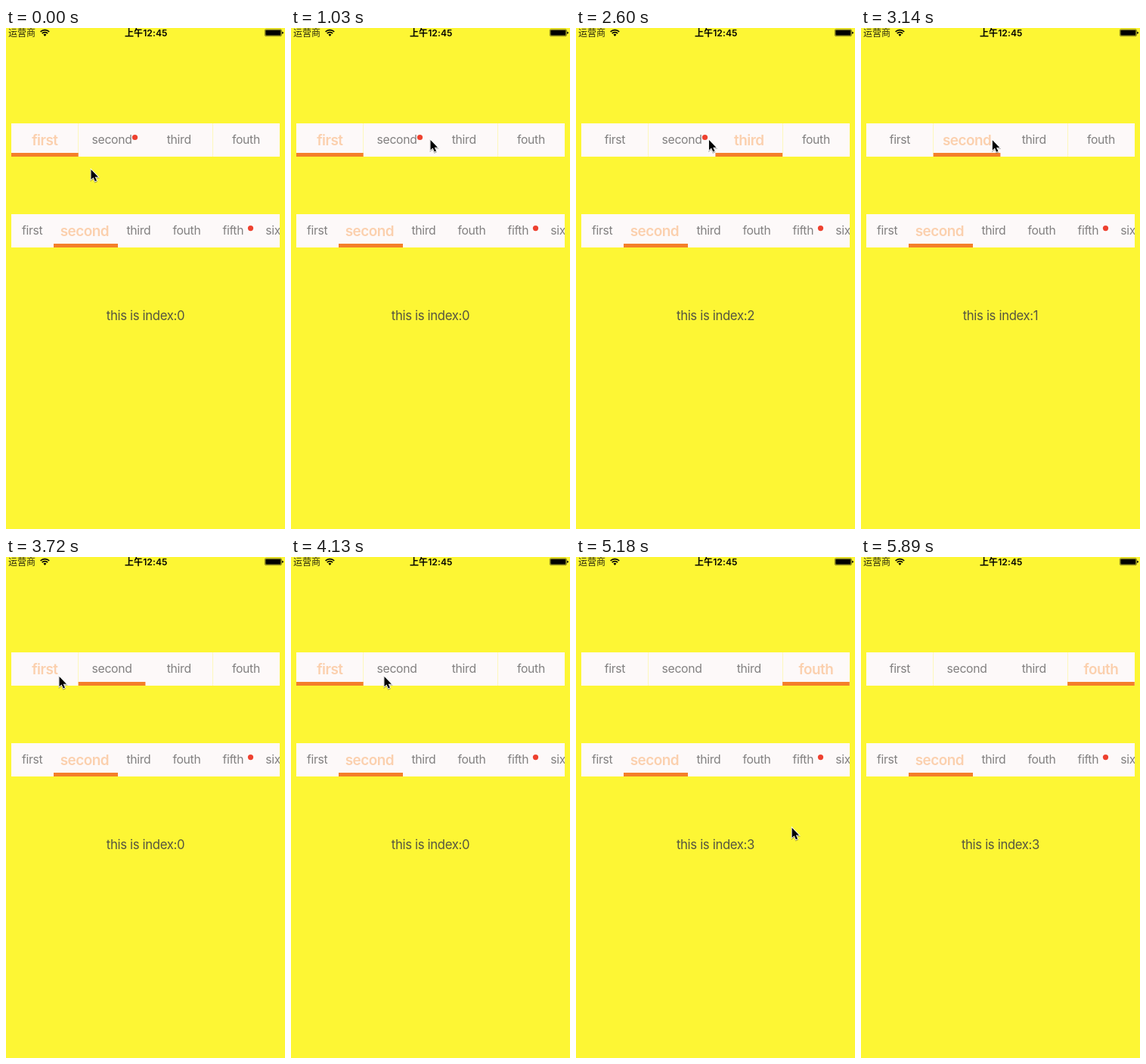
An HTML page for the animation above (6.74 s loop, 369x662 px).

```html
<!DOCTYPE html>
<html lang="zh">
<head>
<meta charset="utf-8">
<title>Segmented tabs</title>
<style>
  html, body { margin: 0; width: 100%; height: 100%; overflow: hidden; background: #fdf634; }
  svg { display: block; width: 100%; height: 100%; }
  text { font-family: Inter, "Noto Sans CJK SC", "Noto Sans CJK", sans-serif; font-optical-sizing: none; }
  .tab, #index { text-anchor: middle; letter-spacing: -.02em; }
  .tab { font-size: 15.74px; fill: #828080; }
  .tab.on { font-size: 18.9px; font-weight: 600; letter-spacing: -.027em; fill: #fbd0ae; }
  #index { font-size: 16.7px; fill: #555540; }
  .status { font-size: 12px; }
  .bar { fill: #fdf9f9; }
  .line { fill: #f47f2a; }
  .dot { fill: #ee412f; }
  .rule { fill: #fdf634; opacity: .3; }
  #cursor { filter: drop-shadow(.4px 1px .7px #0006); }
</style>
</head>
<body>
<svg viewBox="0 0 369 662">
  <defs><clipPath id="stripClip"><rect x="7" y="246" width="355" height="44"/></clipPath></defs>

  <g class="status">
    <text x="3" y="10.5" fill="#28270c">运营商</text>
    <text x="157" y="10.5" font-weight="600" letter-spacing=".1">上午12:45</text>
    <path d="M45.6 5a8.2 8.2 0 0 1 11.6 0M47.7 7.2a5.2 5.2 0 0 1 7.4 0" fill="none" stroke="#000" stroke-width="1.7"/>
    <path d="M51.4 11l-2-2.2a2.8 2.8 0 0 1 4 0z"/>
    <rect x="342.4" y="1.9" width="22" height="8.8" rx="1.4" fill="none" stroke="#000" stroke-width=".5"/>
    <rect x="343.3" y="2.8" width="20.2" height="7" rx=".7"/>
    <path d="M365.2 4.7q1.7 .3 1.7 1.6t-1.7 1.6z"/>
  </g>

  <rect class="bar" x="7" y="126" width="355" height="44"/>
  <rect class="rule" x="95" y="126" width="1" height="44"/>
  <rect class="rule" x="273" y="126" width="1" height="44"/>
  <g id="fixedTabs"></g>
  <rect class="line" id="line" y="165" height="5"/>
  <circle class="dot" id="badge" cx="170.5" cy="144.5" r="3.6"/>

  <g clip-path="url(#stripClip)">
    <rect class="bar" x="7" y="246" width="355" height="44"/>
    <g id="scrollTabs"></g>
    <rect class="line" x="63" y="285" width="85" height="5"/>
    <circle class="dot" cx="323.5" cy="264.6" r="3.6"/>
  </g>

  <text id="index" x="184.5" y="385.6"></text>
  <path id="cursor" d="M1 1v13.2l3-2.8 2.3 5.2 2.2-1-2.3-4.9h4.2z"
        stroke="#fff" stroke-width="1.6" paint-order="stroke"/>
</svg>
<script>
const LOOP = 6740, SLIDE = 300, LEFT = 7, TAB_WIDTH = 88.7;
const $ = id => document.getElementById(id);
const mix = (a, b, p) => a + (b - a) * p;
const ease = v => {
  const p = Math.min(1, Math.max(0, v));
  return p * p * (3 - 2 * p);
};

function addTab(group, name) {
  const label = document.createElementNS("http://www.w3.org/2000/svg", "text");
  label.textContent = name;
  label.setAttribute("class", "tab");
  group.append(label);
  return label;
}

function setSelected(label, selected, middle) {
  label.setAttribute("class", selected ? "tab on" : "tab");
  label.setAttribute("y", middle + (selected ? 6.7 : 5.4));
}

const names = ["first", "second", "third", "fouth", "fifth", "sixth"];

// Equal columns
const fixedTabs = names.slice(0, 4).map((name, i) => {
  const label = addTab($("fixedTabs"), name);
  label.setAttribute("x", LEFT + (i + .5) * TAB_WIDTH);
  return label;
});

// Columns as wide as their text, with equal gaps
let edge = 21;
names.forEach((name, i) => {
  const label = addTab($("scrollTabs"), name);
  const width = label.getComputedTextLength();
  label.setAttribute("x", edge + width / 2);
  edge += width + 29;
  setSelected(label, i === 1, 268);
});

const taps = [
  { at: 0, tab: 0 }, { at: 2100, tab: 2 }, { at: 2840, tab: 1 },
  { at: 3720, tab: 0 }, { at: 4720, tab: 3 }
];
const badgeSeen = taps.find(tap => tap.tab === 1).at;

const home = { x: 111.5, y: 186 };
const glides = [
  { from: 562, to: 1030, x: 183.5, y: 147 },
  { from: 1030, to: 1320, x: 259, y: 152 },
  { from: 2330, to: 2600, x: 175, y: 147 },
  { from: 3120, to: 3370, x: 69.5, y: 157 },
  { from: 4020, to: 4370, x: 292, y: 157 },
  { from: 5000, to: 5350, x: 278, y: 537 },
  { from: 5590, to: 5890, x: 316, y: 675 }
];

function pointerAt(t) {
  return glides.reduce((pos, { from, to, x, y }) => {
    const p = ease((t - from) / (to - from));
    return { x: mix(pos.x, x, p), y: mix(pos.y, y, p) };
  }, home);
}

function draw(t) {
  const i = taps.findLastIndex(tap => tap.at <= t);
  const { at, tab } = taps[i];
  const previous = i ? taps[i - 1].tab : tab;
  const position = mix(previous, tab, ease((t - at) / SLIDE));
  const { x, y } = pointerAt(t);

  fixedTabs.forEach((label, n) => setSelected(label, n === tab, 148));
  $("line").setAttribute("x", LEFT + position * TAB_WIDTH);
  $("badge").setAttribute("visibility", t < badgeSeen ? "visible" : "hidden");
  $("index").textContent = "this is index:" + tab;
  $("cursor").setAttribute("transform", `translate(${x} ${y})`);
}

$("line").setAttribute("width", TAB_WIDTH);
const origin = performance.now();
function tick() {
  draw((performance.now() - origin) % LOOP);
  requestAnimationFrame(tick);
}
tick();
</script>
</body>
</html>
```
